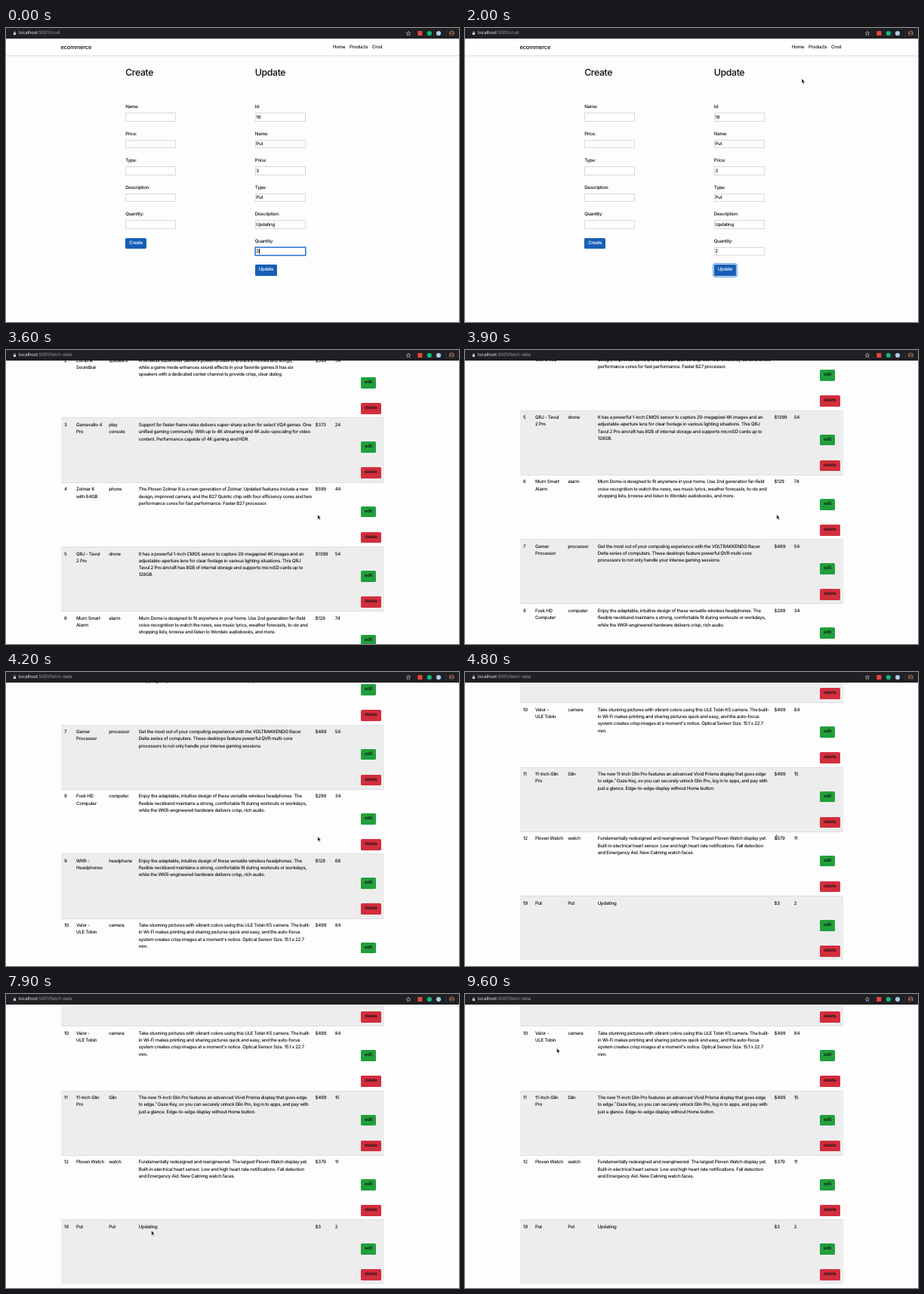
These frames come from a looping animation (600 px wide and 389 px high, 9900 ms). An HTML page:

```html
<!DOCTYPE html>
<html lang="en">
<head>
<meta charset="utf-8">
<title>ecommerce</title>
<style>
  html, body { margin: 0; width: 100%; height: 100%; overflow: hidden; background: #fdfdfd; }
  #stage { position: relative; width: 600px; height: 389px; overflow: hidden; background: #fdfdfd;
    font: 450 6.1px/9.26px Inter, "Liberation Sans", sans-serif; letter-spacing: -.235px; color: #0d0e10;
    text-rendering: geometricPrecision; cursor: default; }
  #stage div, #stage svg { position: absolute; box-sizing: border-box; white-space: nowrap; }
  #page { left: 0; top: 0; width: 600px; height: 389px; }
  .nav { left: 0; top: 14px; width: 600px; height: 23px; background: #fff;
    border-bottom: .5px solid #e3e5e7; box-shadow: 0 1px 2px rgba(0,0,0,.07); }
  #stage .brand { font-size: 7.5px; letter-spacing: -.21px; }
  #stage .title { font-size: 12.3px; font-weight: 500; letter-spacing: -.36px; }
  .input { width: 67px; height: 11.4px; border: .7px solid #d9d9d9; background: #fff; }
  .input.focus { border-color: #3c7fd0; box-shadow: 0 0 0 .8px #5d97dc; }
  .btn { height: 14.7px; border-radius: 1.6px; line-height: 14.7px; text-align: center; }
  .blue { background: #175fb7; color: #fff; }
  .blue.focus { box-shadow: 0 0 0 .7px #fff, 0 0 0 1.7px #4389d8; }
  .green { background: #219f3d; }
  .red { background: #d32e3d; }
  .row { left: 72.5px; width: 428.5px; height: 85.3px; border-top: .5px solid #dcdfe2; }
  .odd { background: #ededed; }
  .head { font-weight: 700; }
  #bar { left: 0; top: 0; width: 600px; height: 14.4px; background: #1f2023; color: #9b9da0;
    font-size: 6px; font-weight: 400; letter-spacing: -.095px; }
  #bar b { font-weight: 400; color: #eceded; }
</style>
</head>
<body>
<div id="stage">
  <div id="page"><div class="nav"></div><div id="crud"></div><div id="list"></div></div>
  <div id="bar">
    <svg width="600" height="14">
      <path d="M10.5 6.5V5.7a1 1 0 0 1 2 0v.8" fill="none" stroke="#d5d6d8" stroke-width=".6"/>
      <rect x="9.9" y="6.3" width="3.2" height="2.7" rx=".3" fill="#d5d6d8"/>
      <path d="M533 4.2l.8 1.9 2 .2-1.5 1.3.5 2-1.8-1.1-1.8 1.1.5-2-1.5-1.3 2-.2z"
        fill="none" stroke="#d5d6d8" stroke-width=".6"/>
      <rect x="545.3" y="4" width="6" height="6" fill="#e8453c"/>
      <circle cx="560.8" cy="7" r="3.1" fill="#15b77c"/>
      <circle cx="573" cy="7" r="3.1" fill="#a9cce6"/>
      <path d="M583 3v8" stroke="#4a4b4e" stroke-width=".5"/>
      <circle cx="590.3" cy="7" r="3.6" fill="#8a5b45"/>
      <path d="M587.6 9.4q2.7-2.6 5.4 0a3.6 3.6 0 0 1-5.4 0z" fill="#32302f"/>
      <circle cx="590.3" cy="6.1" r="1.4" fill="#32302f"/>
    </svg>
  </div>
  <svg id="pointer" width="12" height="14" style="left:-3px;top:-3px">
    <path id="arrow" d="M3 3v6.2l1.4-1.3 1 2.3 1.1-.5-1-2.2h1.9z" fill="#111" stroke="#fff" stroke-width=".5"/>
    <path id="beam" d="M2 .8q1 0 1 .8v4.8q0 .8-1 .8M4 .8q-1 0-1 .8M3 6.4q0 .8 1 .8M2.3 4.4h1.4"
      fill="none" stroke="#333" stroke-width=".6"/>
  </svg>
</div>
<script>
const $ = id => document.getElementById(id);
const LOOP = 9900, STEP = 100;
const ROW = 85.3, TABLE_TOP = 94;

function box(parent, cls, x, y, html = '', width) {
  const el = document.createElement('div');
  el.className = cls;
  el.style.left = x + 'px';
  el.style.top = y + 'px';
  if (width) el.style.width = width + 'px';
  el.innerHTML = html;
  parent.append(el);
  return el;
}
// y is the middle of the first line
const text = (parent, x, y, html, cls = '') => box(parent, cls, x, y - 4.63, html);

// Navigation and address
text($('page'), 72.5, 25.3, 'ecommerce', 'brand');
[[433, 'Home'], [455, 'Products'], [485, 'Crod']].forEach(([x, s]) => text($('page'), x, 25.5, s));
const address = text($('bar'), 17, 7, '');

// Forms
function form(x, title, fields, width) {
  text($('crud'), x, 59, title, 'title');
  let input;
  fields.forEach(([label, value], i) => {
    const y = 105 + i * 35.5;
    text($('crud'), x, y, label + ':');
    input = box($('crud'), 'input', x, y + 7.3);
    text($('crud'), x + 1.5, y + 13.2, value);
  });
  const button = box($('crud'), 'btn blue', x, 100 + fields.length * 35.5, title, width);
  return { input, button };
}
const names = ['Name', 'Price', 'Type', 'Description', 'Quantity'];
const values = ['Put', '3', 'Put', 'Updating', '2'];
form(158.2, 'Create', names.map(n => [n, '']), 28);
const update = form(329.8, 'Update', [['Id', '19'], ...names.map((n, i) => [n, values[i]])], 29.5);
const caret = box($('crud'), '', 334.8, 292.2);
caret.style.cssText += 'width:.6px;height:7px;background:#111';

// Product table
const headphones = 'Enjoy the adaptable, intuitive design of these versatile wireless headphones. The|flexible neckband maintains a strong, comfortable fit during workouts or workdays,|while the WKR-engineered hardware delivers crisp, rich audio.';
const products = [
  [1, 'Curved HD|Screen', 'tv', 'Enjoy bright, detailed pictures from every seat in the room. The slim frame fits|any wall or stand and connects to all of your devices with ease.', '$799', 24],
  [2, 'Lumbrik|Soundbar', 'speakers', 'A wireless subwoofer delivers powerful bass to enhance movies and songs,|while a game mode enhances sound effects in your favorite games.It has six|speakers with a dedicated center channel to provide crisp, clear dialog.', '$399', 54],
  [3, 'Gamevalto 4|Pro', 'play|console', 'Support for faster frame rates delivers super-sharp action for select VQ4 games. One|unified gaming community. With up to 4K streaming and 4K auto-upscaling for video|content. Performance capable of 4K gaming and HDR.', '$373', 24],
  [4, 'Zolmar 8|with 64GB', 'phone', 'The Ploven Zolmar 8 is a new generation of Zolmar. Updated features include a new|design, improved camera, and the B27 Quintic chip with four efficiency cores and two|performance cores for fast performance. Faster B27 processor.', '$599', 44],
  [5, 'QRJ - Tavul|2 Pro', 'drone', 'It has a powerful 1-inch CMOS sensor to capture 20-megapixel 4K images and an|adjustable-aperture lens for clear footage in various lighting situations. This QRJ|Tavul 2 Pro aircraft has 8GB of internal storage and supports microSD cards up to|128GB.', '$1399', 54],
  [6, 'Murn Smart|Alarm', 'alarm', 'Murn Dome is designed to fit anywhere in your home. Use 2nd generation far-field|voice recognition to watch the news, see music lyrics, weather forecasts, to-do and|shopping lists, browse and listen to Wordelo audiobooks, and more.', '$129', 74],
  [7, 'Gamer|Processor', 'processor', 'Get the most out of your computing experience with the VOLTRAKKENDO Racer|Delta series of computers. These desktops feature powerful QVR multi-core|processors to not only handle your intense gaming sessions.', '$489', 54],
  [8, 'Fosk HD|Computer', 'computer', headphones, '$299', 34],
  [9, 'WKR -|Headphones', 'headphone', headphones, '$129', 68],
  [10, 'Velor -|ULE Tobin', 'camera', "Take stunning pictures with vibrant colors using this ULE Tobin K5 camera. The built-|in Wi-Fi makes printing and sharing pictures quick and easy, and the auto-focus|system creates crisp images at a moment's notice. Optical Sensor Size. 15.1 x 22.7|mm.", '$499', 84],
  [11, '11-Inch Glin|Pro', 'Glin', 'The new 11-inch Glin Pro features an advanced Vivid Prisma display that goes edge|to edge.¹ Gaze Key, so you can securely unlock Glin Pro, log in to apps, and pay with|just a glance. Edge-to-edge display without Home button.', '$499', 15],
  [12, 'Ploven Watch', 'watch', 'Fundamentally redesigned and reengineered. The largest Ploven Watch display yet.|Built-in electrical heart sensor. Low and high heart rate notifications. Fall detection|and Emergency Aid. New Calming watch faces.', '$379', 11],
  [19, 'Put', 'Put', 'Updating', '$3', 2]
];
const columns = [77, 93, 136.2, 175.8, 409.6, 435.8];

text($('list'), 72.5, 59, 'Products', 'title');
['Id', 'Name', 'Type', 'Description', 'Price', 'Quantity'].forEach((s, i) =>
  text($('list'), columns[i], 84.5, s, 'head'));
products.forEach((cells, i) => {
  const row = box($('list'), 'row' + (i % 2 ? '' : ' odd'), 72.5, TABLE_TOP + i * ROW);
  cells.forEach((s, c) => text(row, columns[c] - 72.5, 9.2, String(s).replaceAll('|', '<br>')));
  box(row, 'btn green', 397.5, 31, 'edit', 20);
  box(row, 'btn red', 397.5, 65, 'delete', 26.5);
});

// Motion: [time, value, ...], straight between entries
const scroll = [[3100, 0], [3300, 45], [3600, 175.2], [4200, 536.2], [4500, 710],
  [4700, 812], [4800, 821.5], [5000, 820.6], [5200, 819.4]];
const path = [[300, 346, 325], [900, 346, 319], [1200, 346, 318], [1600, 390, 200], [2000, 446, 67],
  [2300, 464, 26], [2600, 464, 26], [3000, 412.8, 217.8], [5100, 412.8, 217.8], [5500, 260, 265],
  [6000, 100, 313], [6300, 104.8, 313.8], [7000, 117, 313], [8000, 201, 313], [8200, 291, 313],
  [8300, 291, 313], [9000, 455, 335], [9300, 480.5, 337], [9600, 121.6, 71.8]];

function at(keys, t) {
  const n = keys.findIndex(k => k[0] > t);
  if (n === 0) return keys[0].slice(1);
  if (n < 0) return keys.at(-1).slice(1);
  const a = keys[n - 1], b = keys[n], p = (t - a[0]) / (b[0] - a[0]);
  return a.slice(1).map((v, i) => v + (b[i + 1] - v) * p);
}

function draw(t) {
  const listed = t >= 2600, pressed = t >= 800;
  $('crud').style.display = listed ? 'none' : '';
  $('list').style.display = listed ? '' : 'none';
  address.innerHTML = '<b>localhost</b>:5001/' + (listed ? 'fetch-data' : 'crud');
  update.input.classList.toggle('focus', !pressed);
  update.button.classList.toggle('focus', pressed);
  caret.style.opacity = !pressed && t < 500 ? 1 : 0;
  $('page').style.top = -at(scroll, t)[0] + 'px';

  const [x, y] = at(path, t);
  const beam = t >= 4800 && t < 5200;
  $('pointer').style.transform = `translate(${x}px, ${y}px)`;
  $('pointer').style.opacity = t < 300 ? 0 : 1;
  $('arrow').style.display = beam ? 'none' : '';
  $('beam').style.display = beam ? '' : 'none';
}

const start = performance.now();
let shown = -1;
function tick() {
  const time = Math.max(0, performance.now() - start) % LOOP;
  const t = Math.min(Math.floor(time / STEP) * STEP, 9600);
  if (t !== shown) draw(shown = t);
  requestAnimationFrame(tick);
}
tick();
</script>
</body>
</html>
```
